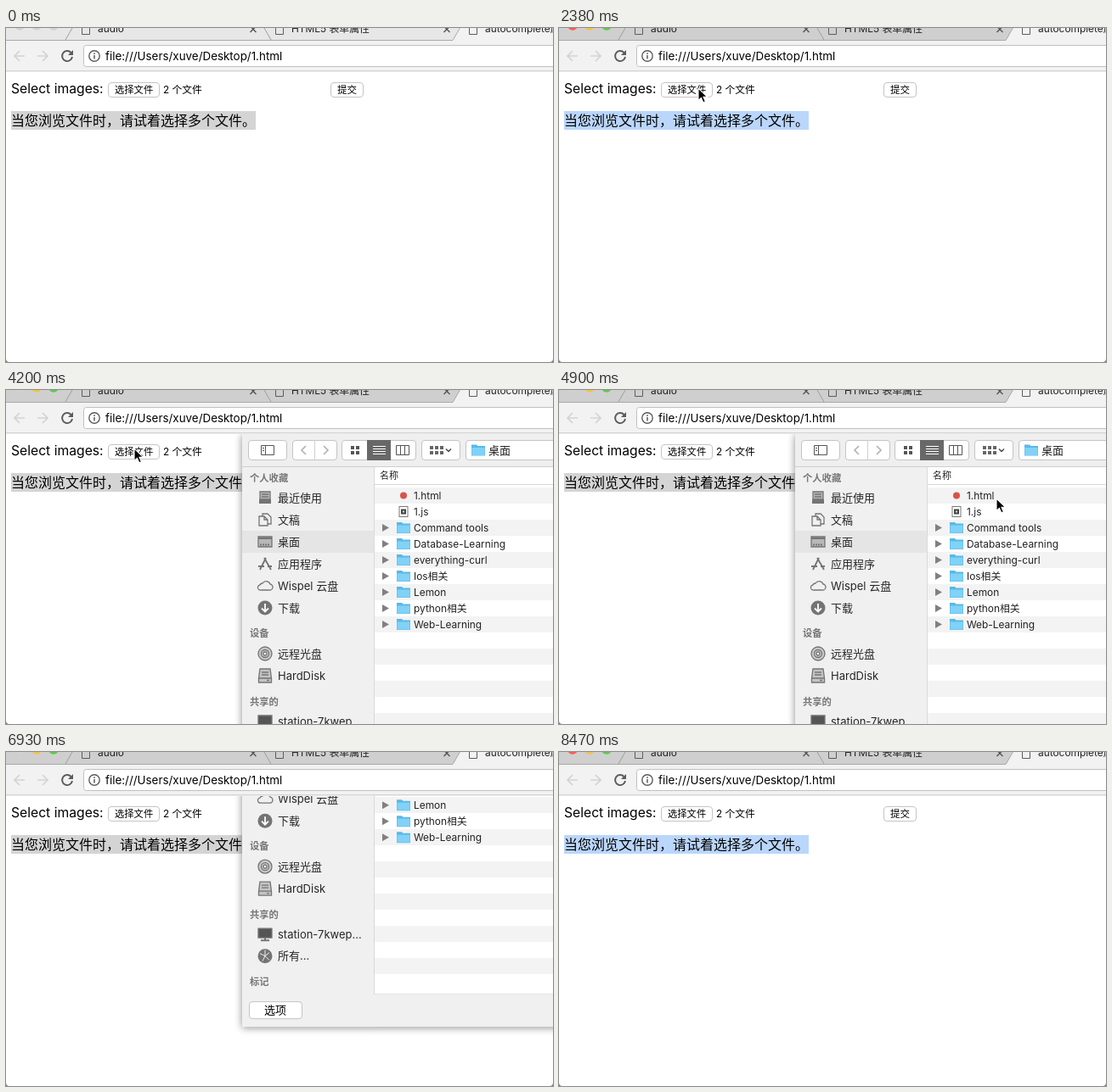
Animation of 644 by 394 pixels, one loop 8750 ms. Source, as an HTML page:

```html
<!DOCTYPE html>
<html lang="zh">
<head>
<meta charset="utf-8">
<style>
html, body { margin: 0; width: 100%; height: 100%; overflow: hidden; background: #fff; }
svg { display: block; font-family: Inter, "Noto Sans CJK SC", "Noto Sans CJK", sans-serif; }
text { white-space: pre; }
#sheet { filter: drop-shadow(0 1px 5px rgba(0,0,0,.45)); }
.icon { fill: none; stroke: #747474; stroke-width: 1.3; }
.solid { fill: #747474; stroke: none; }
.white { fill: none; stroke: #fff; stroke-width: 1.8; }
</style>
</head>
<body>
<svg id="stage" width="644" height="394" viewBox="0 0 644 394"></svg>
<script>
const LOOP = 8750, STEP = 70;
const SHEET_TOP = 52, SHEET_BOTTOM = 500, SLIDE = 290;
const ROW = 19, LIST_TOP = 115;

// y is the vertical middle of the line
const text = (x, y, s, size, attrs = '') =>
  `<text x="${x}" y="${y + size * 0.36}" font-size="${size}" ${attrs}>${s}</text>`;
const rect = (x, y, w, h, fill, attrs = '') =>
  `<rect x="${x}" y="${y}" width="${w}" height="${h}" fill="${fill}" ${attrs}/>`;
const path = (d, stroke, attrs = '') => `<path d="${d}" fill="none" stroke="${stroke}" ${attrs}/>`;
const circle = (x, y, r, attrs) => `<circle cx="${x}" cy="${y}" r="${r}" ${attrs}/>`;
const group = (x, y, body, attrs = '') => `<g transform="translate(${x} ${y})" ${attrs}>${body}</g>`;
const button = (x, y, w, h, attrs = '') =>
  rect(x + .5, y + .5, w - 1, h - 1, '#fff', `rx="3.5" stroke="#c4c4c4" ${attrs}`);

const icons = {
  recent: '<path d="M-6-7H6V2H-6Z" fill="#b5b5b5"/><path d="M-7 2H7V7H-7Z" class="solid"/><path d="M-4-4H4M-4-1H4"/>',
  docs: '<path d="M-3-4V-7H3L7-3V5H3M-7-4H-1L3 0V7H-7ZM-1-4V0H3"/>',
  desktop: '<path d="M-8-6H8V6H-8Z" fill="#b8b8b8"/><path d="M-8-4H8" stroke-width="2"/><path d="M-6 3.5H6" stroke-dasharray="2 1" stroke-width="2"/>',
  apps: '<path d="M-6 7L1-7M-1-7L7 7M-8 3H-1M3 3H8" stroke-width="1.8"/>',
  cloud: '<path d="M-5 5H5A3.5 3.5 0 0 0 6-2A5 5 0 0 0-3-3A3 3 0 0 0-6-1A3 3 0 0 0-5 5Z"/>',
  download: '<circle r="8.5" class="solid"/><path class="white" d="M0-5V4M-4 .5L0 4.5L4 .5"/>',
  disc: '<circle r="8" fill="#c9c9c9"/><circle r="4.5"/><circle r="2" fill="#fff"/>',
  drive: '<path d="M-6-8H6L7.5 3V8H-7.5V3Z" fill="#c4c4c4"/><path d="M-7 3H7M2 5.5H5M-4-4H4M-4-1H4"/>',
  music: '<path d="M-3 5V-6L6-8V3M-3-3L6-5" stroke-width="1.8"/><ellipse cx="-5" cy="5.5" rx="2.7" ry="2.2" class="solid"/><ellipse cx="4" cy="3.5" rx="2.7" ry="2.2" class="solid"/>',
  photo: '<path d="M-9-4H-4L-3-7H3L4-4H9V6H-9Z" class="solid"/><circle r="3.5" cy="1" class="white"/>',
  film: '<path d="M-7-8H7V8H-7ZM-4-8V8M4-8V8M-4 0H4M-7-4H-4M-7 0H-4M-7 4H-4M7-4H4M7 0H4M7 4H4"/>',
  screen: '<path d="M-8-7H8V4H-8Z" fill="#555"/><path d="M-5 7H5M0 4V7" stroke-width="2"/>',
  globe: '<circle r="8.5" class="solid"/><path d="M-6-3L0 0L5-4M0 0L-3 6M0 0L5 5M0 0V-7" stroke="#eee" stroke-width="1"/>'
};
const heading = (y, s) => text(287, y, s, 11.3, 'fill="#767676" font-weight="600"');
const place = ([y, icon, s]) => group(305, y, icons[icon], 'class="icon"') + text(320, y, s, 13, 'fill="#262626"');
const places = list => list.map(place).join('');

function tab(x, title) {
  return path(`M${x}.5-3V7.5H${x + 9}.5V-3`, '#5c5c5c') + text(x + 19, .8, title, 11.9, 'fill="#222"');
}
const closeMark = x => path(`M${x - 3.5}-2L${x + 3.5} 5M${x + 3.5}-2L${x - 3.5} 5`, '#555', 'stroke-width="1.4"');

function browser() {
  return rect(0, 0, 644, 14, '#cfcfcf', 'id="strip"') +
    [16, 36, 56].map(x => circle(x, -3.2, 6, 'class="light"')).join('') +
    path('M78 0L70 14M304 0L312 14', '#9e9e9e') +
    tab(89, 'audio') + closeMark(291) + tab(317, 'HTML5 表单属性') + closeMark(519) +
    rect(0, 14, 644, 37, '#f2f2f2') +
    '<path d="M526 15L535-1H644V15Z" fill="#f2f2f2"/>' +
    path('M0 14.5H526L535-1', '#a9a9a9') + tab(545, 'autocomplete属性') +
    path('M22 33H10M16 27L10 33L16 39M37 33H49M43 27L49 33L43 39', '#d3d3d3', 'stroke-width="1.7"') +
    path('M76.5 29A6 6 0 1 0 78 34', '#5b5b5b', 'stroke-width="1.9"') +
    '<path d="M79 26V32H73Z" fill="#5b5b5b"/>' +
    rect(91.5, 20.5, 570, 25, '#fff', 'rx="3" stroke="#c0c0c0"') +
    circle(104, 33, 6.2, 'fill="none" stroke="#5b5b5b" stroke-width="1.4"') +
    path('M104 32V36.5M104 29.3V31', '#5b5b5b', 'stroke-width="1.5"') +
    text(117, 33, 'file:///Users/xuve/Desktop/1.html', 13.4) +
    rect(0, 50.5, 644, 1, '#b5b5b5') + rect(0, 51.5, 644, 343, '#fff');
}

function page() {
  return text(6, 71.5, 'Select images:', 15.7) +
    button(120, 64, 61, 18, 'id="choose"') + text(128, 73, '选择文件', 11.3) +
    text(185, 73, '2 个文件', 11.8) +
    button(382, 64, 39, 18) + text(390, 73, '提交', 11.5) +
    rect(6, 98, 288, 22, '#d4d4d4', 'id="highlight"') +
    text(6, 109, '当您浏览文件时，请试着选择多个文件。', 16) +
    '<path d="M0 390V394H4Q0 394 0 390M644 390V394H640Q644 394 644 390" fill="#777"/>';
}

function toolbar() {
  return rect(278, 52, 400, 38, '#efefef') + rect(278, 90, 400, 1, '#cfcfcf') +
    button(285, 59, 46, 24) + path('M300.5 65.5H315.5V76.5H300.5ZM305.5 65V77M302 68.5H304M302 71.5H304', '#555') +
    button(337, 59, 53, 24) + path('M363.5 59V83', '#d0d0d0') +
    path('M353 66L348 71L353 76M374 66L379 71L374 76', '#b0b0b0', 'stroke-width="1.6"') +
    button(395, 59, 88, 24) + rect(425, 59, 28, 24, '#686868') +
    [406, 412].map(x => [66, 72].map(y => rect(x, y, 4, 4, '#555')).join('')).join('') +
    path('M432 66.5H447M432 69.5H447M432 72.5H447M432 75.5H447', '#fff') +
    path('M459.5 65.5H474.5V76.5H459.5ZM464.5 65V77M469.5 65V77', '#555') +
    button(489, 59, 46, 24) +
    [499, 505, 511].map(x => [66, 72].map(y => rect(x, y, 4, 4, '#666')).join('')).join('') +
    path('M518 69.5L521 72.5L524 69.5', '#444', 'stroke-width="1.4"') +
    button(541, 59, 140, 24) + folder(548, 71) + text(568, 71, '桌面', 13, 'fill="#222"');
}

function folder(x, y) {
  return group(x, y, '<path d="M0-6.5H6L7.5-5H16V6.5H0Z" fill="#58b9e6"/><path d="M.5-3H15.5V6H.5Z" fill="#80d2f7"/>');
}

function sidebar() {
  return rect(278, 91, 155, 409, '#f0f0f0') + rect(278, 166, 155, 26, '#e5e5e5') +
    heading(104, '个人收藏') +
    places([[127, 'recent', '最近使用'], [153, 'docs', '文稿'], [179, 'desktop', '桌面'],
      [205, 'apps', '应用程序'], [231, 'cloud', 'Wispel 云盘'], [257, 'download', '下载']]) +
    heading(287, '设备') + places([[311, 'disc', '远程光盘'], [337, 'drive', 'HardDisk']]) +
    '<g id="media">' + heading(366.5, '媒体') +
    places([[388.5, 'music', '音乐'], [414.5, 'photo', '照片'], [440.5, 'film', '影片']]) + '</g>' +
    '<g id="shared">' + heading(367.5, '共享的') +
    places([[391, 'screen', 'station-7kwep...'], [416.5, 'globe', '所有...']]) + heading(447, '标记') + '</g>';
}

function fileList() {
  const names = ['1.html', '1.js', 'Command tools', 'Database-Learning', 'everything-curl',
    'Ios相关', 'Lemon', 'python相关', 'Web-Learning'];
  const fileIcons = [
    circle(468, 0, 4, 'fill="#d9534a"'),
    rect(463, -6, 10, 12, '#fff', 'stroke="#777"') + rect(465, -3, 6, 6, '#444') + rect(467, -1, 2, 2, '#ddd')
  ];
  const stripes = [...Array(18)].map((_, i) =>
    rect(434, LIST_TOP + i * ROW, 220, ROW, i % 2 ? '#fff' : '#f3f3f3')).join('');
  const rows = names.map((name, i) => {
    const icon = fileIcons[i] || '<path d="M443-4.5L451 0L443 4.5Z" fill="#808080"/>' + folder(460, 0);
    return group(0, LIST_TOP + (i + .5) * ROW,
      (i < 2 ? rect(434, -9.5, 220, 18.3, '#2167d6', 'class="picked"') : '') +
      icon + text(480, 0, name, 11.9, 'class="name"'), 'fill="#222"');
  }).join('');
  return rect(434, 91, 220, 370, '#fff') + text(440, 101, '名称', 11, 'fill="#222"') +
    rect(434, 111, 220, 1, '#d8d8d8') + stripes + `<g id="files">${rows}</g>` +
    rect(433, 91, 1, 370, '#d9d9d9') + rect(278, 461, 400, 39, '#f0f0f0');
}

const stage = document.getElementById('stage');
stage.innerHTML =
  `<defs><clipPath id="below"><path d="M0 ${SHEET_TOP}H644V394H0Z"/></clipPath>
  <linearGradient id="blue" x2="0" y2="1"><stop stop-color="#66a4f7"/><stop offset="1" stop-color="#2669dd"/></linearGradient></defs>` +
  browser() + page() +
  `<g clip-path="url(#below)"><g id="sheet">${sidebar() + fileList() + toolbar()}` +
  button(286, 470, 63, 21) + text(304, 480.5, '选项', 13) + '</g></g>' +
  '<path id="cursor" d="M0 0V14.5L3.4 11.4L5.8 16.8L8.4 15.7L6 10.4H10.6Z" fill="#000" stroke="#fff" stroke-width="1.1"/>';

const el = id => document.getElementById(id);
const lights = document.querySelectorAll('.light');
const picked = document.querySelectorAll('.picked');
const fileNames = document.querySelectorAll('.name');
const show = (node, on) => node.setAttribute('visibility', on ? 'inherit' : 'hidden');
const fill = (node, color) => node.setAttribute('fill', color);
const ease = u => (1 - Math.cos(Math.PI * Math.min(1, Math.max(0, u)))) / 2;

// time, x, y of the pointer tip
const route = [[70, 500, 268], [350, 408, 95], [490, 408, 95], [560, 385, 58], [700, 385, 58],
  [1190, 300, 52], [1470, 300, 52], [2310, 164, 71], [2380, 164, 71], [3220, 151, 69],
  [4200, 151, 69], [4830, 515, 128], [5180, 515, 128], [5390, 500, 127], [5600, 491, 150],
  [6020, 491, 150], [6160, 559, 323], [6580, 559, 323], [6720, 600, 420], [7420, 621, 420],
  [7490, 621, 368], [8050, 450, 92], [8190, 450, 92], [8400, 621, -20], [LOOP, 621, -20]];

function pointer(t) {
  const i = route.findIndex(k => k[0] > t);
  if (i < 1) return [-50, -50];
  const [a, b] = [route[i - 1], route[i]];
  const u = ease((t - a[0]) / (b[0] - a[0]));
  return [a[1] + (b[1] - a[1]) * u, a[2] + (b[2] - a[2]) * u];
}

function draw(t) {
  const active = t >= 140, open = t >= 3640 && t < 7140, loaded = t >= 4060;
  const shown = ease((t - 3630) / SLIDE) - ease((t - 6805) / SLIDE);
  fill(el('strip'), active ? '#cfcfcf' : '#e7e7e7');
  ['#fc5b57', '#f5c04d', '#5ec94a'].forEach((color, i) =>
    fill(lights[i], !active || (open && i === 0) ? '#d2d2d2' : color));
  fill(el('highlight'), active && !(open && loaded) ? '#bad6fb' : '#d4d4d4');
  fill(el('choose'), t >= 3500 && !loaded ? 'url(#blue)' : '#fff');

  show(el('sheet'), open);
  el('sheet').setAttribute('transform', `translate(0 ${(shown - 1) * (SHEET_BOTTOM - SHEET_TOP)})`);
  show(el('media'), !loaded);
  show(el('shared'), loaded);
  show(el('files'), loaded);
  [5250, 5670].forEach((at, i) => {
    show(picked[i], t >= at);
    fill(fileNames[i], t >= at ? '#fff' : '#222');
  });
  el('cursor').setAttribute('transform', `translate(${pointer(t)})`);
}

function frame() {
  draw(Math.floor(performance.now() % LOOP / STEP) * STEP);
  requestAnimationFrame(frame);
}
frame();
</script>
</body>
</html>
```
